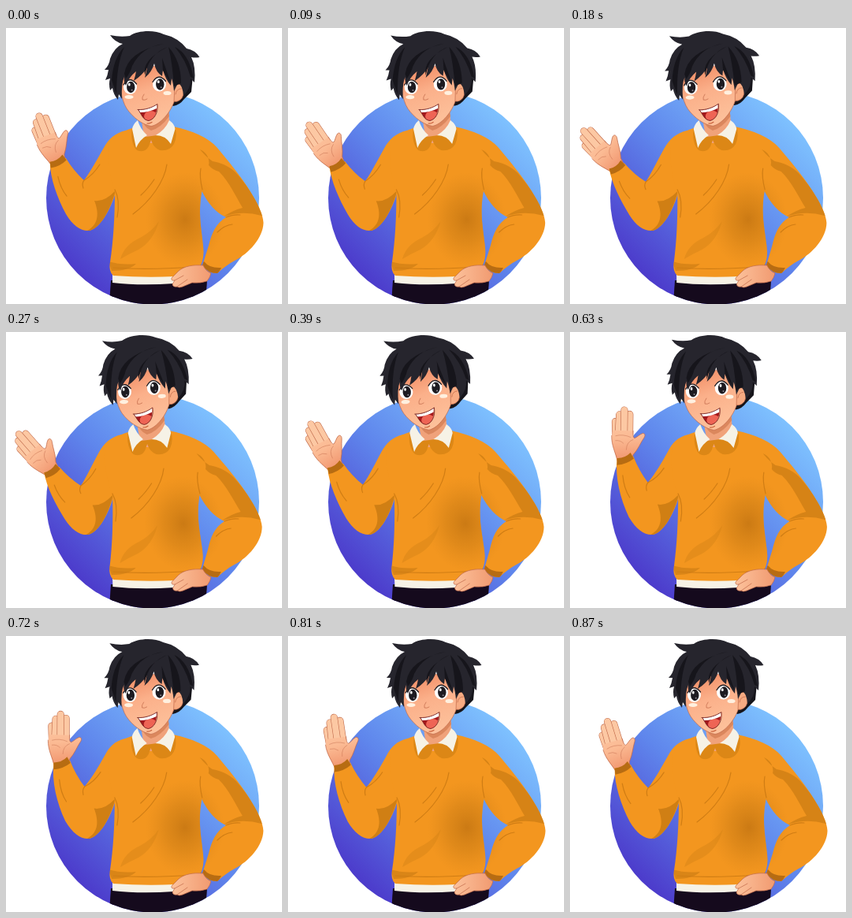
Animation of 350 by 350 pixels, one loop 0.9 s. Source, as an HTML page:

```html
<!DOCTYPE html>
<html lang="en">
<head>
<meta charset="utf-8">
<title>Waving boy</title>
<style>
html, body { margin: 0; width: 100%; height: 100%; overflow: hidden; background: #fff; }
svg { display: block; width: 100%; height: 100%; }
path, line { stroke-linecap: round; stroke-linejoin: round; }
.knit { fill: #f3961f; }
.shade { fill: #d07f14; }
.cuff { fill: #b76c12; }
.fold { fill: none; stroke: #d07d14; stroke-width: 1.2; }
.skinline { fill: none; stroke: #c0694a; stroke-width: .7; }
.shirt { fill: #f6f2e6; }
.hair { fill: #26252d; }
.lock { fill: #16151b; }
</style>
</head>
<body>
<svg viewBox="0 0 350 350">
  <defs>
    <linearGradient id="sky" gradientUnits="userSpaceOnUse" x1="278" y1="112" x2="92" y2="312">
      <stop offset="0" stop-color="#7fc3ff"/>
      <stop offset=".5" stop-color="#5f86ec"/>
      <stop offset="1" stop-color="#4c3bcb"/>
    </linearGradient>
    <linearGradient id="palm" gradientUnits="userSpaceOnUse" x1="-4" y1="-60" x2="4" y2="6">
      <stop offset="0" stop-color="#fdcba8"/>
      <stop offset=".55" stop-color="#fbba93"/>
      <stop offset="1" stop-color="#f0936c"/>
    </linearGradient>
    <linearGradient id="face" gradientUnits="userSpaceOnUse" x1="160" y1="48" x2="186" y2="122">
      <stop offset="0" stop-color="#f08a62"/>
      <stop offset=".45" stop-color="#fbb08a"/>
      <stop offset="1" stop-color="#fdc19b"/>
    </linearGradient>
    <linearGradient id="hip" x1="0" y1="0" x2="1" y2="0">
      <stop offset="0" stop-color="#fcc29c"/>
      <stop offset="1" stop-color="#f19a70"/>
    </linearGradient>
    <radialGradient id="dusk">
      <stop offset="0" stop-color="#c47512" stop-opacity=".85"/>
      <stop offset=".5" stop-color="#cd7d15" stop-opacity=".5"/>
      <stop offset="1" stop-color="#d9851a" stop-opacity="0"/>
    </radialGradient>
    <path id="sweater" d="M163,126 C151,130 140,134 133,143 C126,160 132,190 138,208 C138,240 136,270 132,297 Q130,309 136,314 Q176,317 215,315 L246,303 Q252,292 250,276 C248,255 243,235 248.500,207 C256,222 266,234 279,240 C266,248 261,260 257,276 L249,301 Q256,311 268,311 C276,304 282,299 290,295 C308,286 326,266 326.500,247 C326,236 319,222 309,206 C296,185 281,168 268,152 C257,139 236,130 212,125 Q188,150 163,126Z"/>
    <clipPath id="cloth"><use href="#sweater"/></clipPath>
    <clipPath id="disc"><circle cx="186" cy="215.500" r="135"/></clipPath>
    <clipPath id="mouth"><path d="M168,104 C177,104 185,101 191,97 C192,108 188,116 181,117.500 C174,117 172,110 168,104Z"/></clipPath>
  </defs>

  <circle cx="186" cy="215.500" r="135" fill="url(#sky)"/>
  <path clip-path="url(#disc)" fill="#150a1d" d="M133,320 L255,320 L253,350 L131,350Z"/>

  <g id="body">
    <path class="shirt" d="M135,311 L218,313 L213,324 Q170,327 135,323Z"/>
    <g id="hand">
      <g id="fingers"></g>
      <path fill="url(#palm)" d="M-9,7 C-11,-4 -17,-13 -17,-24 L-16,-33 L9,-33 C10,-28 10,-25 12,-24 C15,-25 18,-29 22,-30.500 C25,-31 26,-28 24,-25 C20,-19 17,-10 11,-3 L9,7Z"/>
      <path class="skinline" d="M-9,5 C-11,-4 -17,-13 -17.200,-26 M10,-33 C10,-28 10,-25 12,-24 C15,-25 18,-29 22,-30.500 C25,-31 26,-28 24,-25 C20,-19 17,-10 11,-3 L9,4"/>
      <path class="skinline" opacity=".6" d="M-12,-26 Q-3,-29 7,-25 M10,-22 Q2,-19 2,-9 M-12,-20 Q-6,-21 -2,-17"/>
    </g>
    <g id="sleeve"></g>

    <use href="#sweater" class="knit"/>
    <g clip-path="url(#cloth)">
      <ellipse cx="227" cy="243" rx="50" ry="60" fill="url(#dusk)"/>
      <path class="shade" opacity=".4" d="M145,293 Q150,275 170,266 Q185,258 194,245 Q187,270 168,281 Q155,287 145,293Z"/>
      <path class="shade" opacity=".75" d="M130,296 Q146,301 165,299 Q156,308 134,308Z"/>
      <path class="shade" opacity=".8" d="M246,154 C254,157 259,166 257,174 Q262,180 270,182 C283,195 291,213 300,228 Q288,231 276,239 Q300,231 324,238 L330,238 C320,220 305,199 292,184 C282,174 272,171 262,169 Q254,164 246,154Z"/>
      <path class="cuff" d="M246,301 L251,296 Q258,305 273,304 L268,313 Q254,313 246,301Z"/>
    </g>
    <path class="fold" d="M204,173 C201,194 184,219 161,236 M188,192 Q180,204 171,212 M249,205 Q245,188 247,178 M287,249 Q277,250 268,259 M279,240 Q289,236 297,237 M136,304 Q180,307 238,303"/>
    <path class="fold" d="M138,205 Q145,218 141,240"/>

    <path fill="url(#hip)" stroke="#c0694a" stroke-width=".7" d="M250,301 C237,300 226,302 219,308 L210,317 Q209,321 214,320 L211,325 Q212,329 217,328 Q219,330 224,328 L236,323 Q247,324 255,321 Q259,316 260,311 Q253,308 250,301Z"/>
    <path class="skinline" d="M214,320 L225,314 M217,328 L230,319"/>

    <path fill="#f0a27a" d="M172,110 L206,106 L208,124 Q198,138 187,146 L180,146 Q172,134 172,110Z"/>
    <path fill="#db875d" d="M172,112 L206,104 L207,112 Q196,127 184,130 Q174,126 172,112Z"/>
    <path fill="#dc8716" d="M160,127 C158,138 160,150 166,155 Q176,159 181,150 L184,142 Q187,152 195,155 Q207,157 213,147 Q218,136 214,125 L192,136 L177,138Z"/>
    <path class="shirt" d="M167,117 Q161,122 160,128 L165,152 Q169,142 179,136 Q170,128 167,117Z"/>
    <path class="shirt" d="M207,117 Q214,122 214.500,128 L209,147 Q202,136 190,136 Q202,129 207,117Z"/>
  </g>

  <g id="head">
    <path class="lock" d="M204,56 L238,50 L235,81 L226,90 Q220,98 212,99 L204,92Z"/>
    <path fill="#f7ab82" stroke="#c0694a" stroke-width=".7" d="M211,77 Q218,68 224,73 Q228,80 223,89 Q217,96 210,92Z"/>
    <path class="skinline" d="M215,84 Q216,77 222,77"/>
    <path fill="url(#face)" stroke="#c0694a" stroke-width=".7" d="M145,50 C143,70 146,91 153,102 C161,114 174,123 184,124.500 C194,123 207,110 213,94 L215,48Z"/>
    <ellipse cx="156" cy="87.500" rx="5.500" ry="2.600" fill="#fff0df"/>
    <ellipse cx="204.500" cy="82.500" rx="5" ry="2.600" fill="#fff0df"/>
    <g id="eyes"></g>
    <path class="skinline" d="M175,84 Q172,88 173,91 Q176,92 179,90"/>
    <path fill="none" stroke="#c8623c" stroke-width="1.200" d="M179,121 Q182,121.500 185,119.500"/>
    <g clip-path="url(#mouth)">
      <rect x="165" y="92" width="30" height="28" fill="#a3181c"/>
      <ellipse cx="183.500" cy="112" rx="8.500" ry="7" fill="#ee6455"/>
      <path fill="#fff" d="M167,102 Q181,104 192,95 L191,102 Q181,107 170,107Z"/>
    </g>
    <path fill="none" stroke="#6b1b1c" stroke-width=".8" d="M167,103.500 C177,104 185,101 192,96.500 C193,108 188,116 181,117.500 C174,117 172,110 168,104"/>
    <path class="hair" d="M132,9 Q145,12 157,10 C167,3 188,2 200,8 Q218,12 229,26 Q240,28 245.500,37 Q240,38 235,37 Q241,49 239,69 L234,64 Q235,76 225,86 Q224,72 218,70 L213,80 Q212,70 210,64 L209,73 Q202,65 199,53 L198,61 Q190,56 188,45 Q185,56 176,63 Q178,56 179,50 Q173,60 162,67 Q164,61 165,55 Q156,62 152,73 Q149,68 150,62 Q146,70 147,90 L143,84 L142,91 Q136,84 135,76 L132,79 Q130,71 132,64 L126,66 Q129,60 130,53 L125,53 Q131,47 132,39 Q137,25 148,20 Q138,18 132,9Z"/>
    <path class="lock" d="M200,20 Q172,24 160,48 Q158,56 152,64 L150,58 Q154,30 200,20Z M205,24 Q182,32 176,60 Q172,40 205,24Z M206,24 Q222,42 222,70 L213,74 Q211,44 206,24Z M214,24 Q232,32 238,64 L234,62 Q228,40 214,24Z M150,24 Q136,38 134,66 L140,84 Q140,46 150,24Z M198,38 L209,70 L199,54Z"/>
  </g>
</svg>
<script>
const LOOP = 900, STEP = 30;
const $ = id => document.getElementById(id);
const clamp = v => Math.max(0, Math.min(1, v));
const ease = v => (1 - Math.cos(Math.PI * clamp(v))) / 2;

function add(parent, tag, attrs) {
  const el = document.createElementNS('http://www.w3.org/2000/svg', tag);
  for (const name in attrs) el.setAttribute(name, attrs[name]);
  parent.appendChild(el);
  return el;
}

// Fingers: base x, base y, tip x, tip y
for (const [x1, y1, x2, y2] of [[-12, -27, -13, -44], [-8.5, -30, -8, -53], [5.5, -29, 5, -54], [-1.5, -30, -2, -59]]) {
  const seg = { x1, y1, x2, y2 };
  add($('fingers'), 'line', { ...seg, stroke: '#c0694a', 'stroke-width': 9.2 });
  add($('fingers'), 'line', { ...seg, stroke: '#fcc8a3', 'stroke-width': 8 });
}

// Eyes: centre x, centre y
for (const [x, y] of [[157.5, 75], [194.5, 71.5]]) {
  const eyes = $('eyes');
  add(eyes, 'ellipse', { cx: x, cy: y, rx: 8.5, ry: 9, fill: '#fff' });
  add(eyes, 'ellipse', { cx: x + .8, cy: y, rx: 5.2, ry: 7.2, fill: '#1d1b21' });
  add(eyes, 'ellipse', { cx: x - 1.2, cy: y - 3.3, rx: 1.4, ry: 1.9, fill: '#fff' });
  add(eyes, 'circle', { cx: x + 2.2, cy: y + 3.8, r: 1, fill: '#8b8790' });
  add(eyes, 'path', {
    d: `M${x - 8.5},${y - 3} Q${x - 1},${y - 15} ${x + 8},${y - 4}`,
    fill: 'none', stroke: '#1d1b21', 'stroke-width': 1.3
  });
}

const sleeve = [
  ['knit', 'M152,130 C138,133 130,141 124,152 C116,166 108,181 99,193 Q86,181 76,164 Q67,170 56,169 C56,190 65,215 76,236 C85,251 95,258 106,257 C120,253 132,231 139,209 L160,180Z'],
  ['shade', 'M103,257 C118,249 118,234 112,219 Q125,221 139,206 C132,231 120,253 106,257Z'],
  ['cuff', 'M56,169 Q66,168 72,160 L77,167 Q69,175 57,177Z'],
  ['fold', 'M99,193 Q96,197 98,203 M99,193 Q111,186 119,173 M66,188 Q69,203 77,213']
].map(([cls, d]) => ({ d, el: add($('sleeve'), 'path', { class: cls }) }));

// Swing a sleeve point; the effect grows towards the cuff
function bend(x, y, swing) {
  const w = clamp((250 - y) / 80) * clamp((135 - x) / 50);
  const a = -.128 * swing * w, c = Math.cos(a), s = Math.sin(a);
  const dx = x - 131, dy = y - 206;
  return [131 + dx * c - dy * s, 206 + dx * s + dy * c];
}

function draw(t) {
  const swing = Math.sin(2 * Math.PI * (t + 10) / LOOP);
  const lean = t < 340 ? ease(t / 340) : 1 - ease((t - 340) / 450);

  for (const { d, el } of sleeve) {
    el.setAttribute('d', d.replace(/([\d.]+),([\d.]+)/g,
      (_, x, y) => bend(+x, +y, swing).map(v => v.toFixed(2)).join()));
  }
  const [wx, wy] = bend(65, 166, swing);
  $('hand').setAttribute('transform', `translate(${wx} ${wy}) rotate(${-19 - 22 * swing})`);
  $('body').setAttribute('transform', `matrix(1 0 ${.0324 * lean} 1 ${-10.05 * lean} 0)`);
  $('head').setAttribute('transform', `translate(${-5.3 * lean} 0) rotate(${-2.9 * lean} 178 125)`);
}

function tick() {
  draw(Math.floor(performance.now() % LOOP / STEP) * STEP);
  requestAnimationFrame(tick);
}
tick();
</script>
</body>
</html>
```
